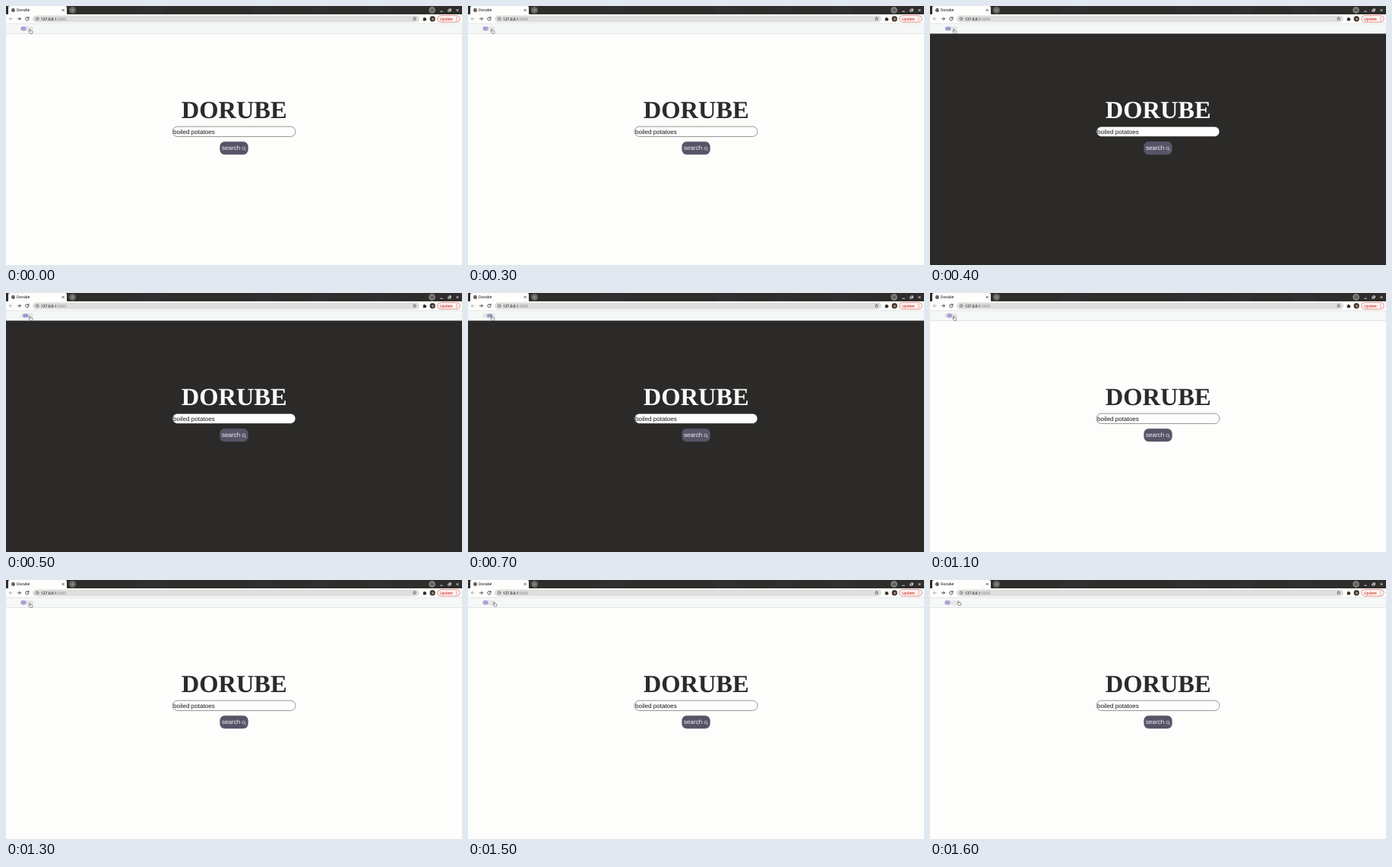
Animation of 600x342 px, one loop 1700 ms. Source, as an HTML page:

```html
<!DOCTYPE html>
<html lang="en">
<head>
<meta charset="utf-8">
<title>Dorube</title>
<style>
  html, body { margin: 0; width: 100%; height: 100%; overflow: hidden; }
  svg { display: block; width: 100%; height: 100%; }
  text { text-rendering: geometricPrecision; }
  .ui { font: 4.9px "Open Sans", "Noto Sans", sans-serif; stroke-width: .15; }
  .page { font: 8.1px "Liberation Sans", Arial, sans-serif; }
  .logo { font: bold 32.5px "Liberation Serif", "Times New Roman", serif; text-anchor: middle; }
  .line { fill: none; stroke-linecap: round; stroke-linejoin: round; }
</style>
</head>
<body>
<svg viewBox="0 0 600 342" xmlns="http://www.w3.org/2000/svg">
  <rect id="bg" width="600" height="342"/>

  <!-- tab strip -->
  <rect width="600" height="12" fill="#2e2d2c"/>
  <path d="M180 0h34l-12 11h-34zM318 0h30l14 11h-32zM410 0h22l-12 11h-26zM470 0h30l12 11h-30z" fill="#343332" opacity=".6"/>
  <path d="M1 12q2 0 2-2V2q0-2 2-2H78q2 0 2 2v8q0 2 2 2z" fill="#fdfdfc"/>
  <circle cx="9.500" cy="5.500" r="2.400" fill="#3c3b3a"/>
  <path class="line" d="M8 4.800l1.500.5-.4 1.400M10.200 3.800l.2 1 1 .5" stroke="#e4e4e2" stroke-width=".5"/>
  <text class="ui" x="14" y="7.200" fill="#302f2e" stroke="#302f2e">Dorube</text>
  <path class="line" d="M74 4.300l2.300 2.300m0-2.300l-2.300 2.300" stroke="#3a3938" stroke-width=".8"/>
  <circle cx="87.500" cy="5.500" r="4.500" fill="#696765"/>
  <path class="line" d="M85.800 5.500h3.400m-1.700-1.700v3.400" stroke="#a3a19e" stroke-width=".7"/>
  <circle cx="560.600" cy="5.500" r="4.400" fill="#82807d"/>
  <circle class="line" cx="560.600" cy="5.500" r="2" stroke="#4b4947" stroke-width=".7"/>
  <path d="M559.500 5.100h2.200l-1.100 1.300z" fill="#302e2c"/>
  <g class="line" stroke="#e6e4e1" stroke-width=".9">
    <path d="M571.700 7.200h2.600M582.200 5h2.200v2.200h-2.200zM583.300 3.900h2.200v2.200M592.900 4.400l2.300 2.300m0-2.300l-2.300 2.300"/>
  </g>

  <!-- toolbar -->
  <rect y="11" width="600" height="13" fill="#fdfdfc"/>
  <g class="line" stroke="#3d3c3b" stroke-width=".9">
    <path d="M8.200 16.900H4.400m1.700-1.800l-1.800 1.800 1.800 1.800" stroke="#a9a8a6"/>
    <path d="M15.500 16.900h3.800m-1.700-1.800l1.800 1.800-1.800 1.800"/>
    <path d="M29.600 15.500a2.200 2.200 0 1 0 .5 2M30 14.500v1.600h-1.600"/>
  </g>
  <rect x="35" y="12.600" width="509" height="8.800" rx="4.400" fill="#dededc"/>
  <circle class="line" cx="41" cy="16.900" r="2" stroke="#5b5a58" stroke-width=".6"/>
  <path class="line" d="M41 16.700v1.100M41 15.800v.1" stroke="#5b5a58" stroke-width=".6"/>
  <text class="ui" x="46" y="18.600" fill="#2e2d2c" stroke="#2e2d2c">127.0.0.1<tspan fill="#777674" stroke="none">:5000</tspan></text>
  <path class="line" id="star" stroke="#555452" stroke-width=".7"/>
  <path d="M548.700 15.700h1.200a.8.800 0 0 1 1.600 0h1.200v1.200a.8.800 0 0 1 0 1.600v1h-4v-1.200a.8.800 0 0 0 0-1.500z" fill="#2b2a29"/>
  <circle cx="561.200" cy="16.900" r="3.600" fill="#3f352e"/>
  <ellipse cx="561.500" cy="17.200" rx="1.500" ry="1.800" fill="#a58a76"/>
  <rect x="567.700" y="12.600" width="29.600" height="8.700" rx="4.350" fill="#fdf6f5" stroke="#dc7770" stroke-width=".8"/>
  <text class="ui" x="571" y="18.600" fill="#d33d34" stroke="#d33d34">Update</text>
  <path class="line" d="M593 14.900v.1m0 1.900v.1m0 1.900v.1" stroke="#d33d34" stroke-width="1"/>

  <!-- page header -->
  <rect id="nav" y="23" width="600" height="13.500"/>
  <path d="M0 23.400h600" stroke="#dfe1e0" stroke-width=".7"/>
  <path id="rule" d="M0 36.500h600" stroke="#dcdfdf" stroke-width=".8"/>
  <rect x="19" y="26.800" width="17" height="6.400" rx="3.200" fill="#e7e7e5"/>
  <rect id="knob" width="7.200"/>

  <!-- search form -->
  <text id="logo" class="logo" x="300.200" y="148.400">DORUBE</text>
  <rect id="field" x="219" y="159.200" width="162" height="13.300" rx="6.650" fill="#fefefd" stroke-width=".7"/>
  <text class="page" x="220" y="168.700" fill="#171716">boiled potatoes</text>
  <rect id="button" x="281.600" y="179.300" width="36.800" height="16.800" rx="6" fill="#575467" stroke-width=".4"/>
  <text class="page" x="284" y="190.300" fill="#f4f3f5">search</text>
  <path class="line" d="M310.900 188a1.900 1.900 0 1 0 3.800 0a1.900 1.900 0 1 0-3.800 0M314.200 189.400l1.500 1.600" stroke="#dddce2" stroke-width=".7"/>

  <path id="hand" d="M-1.400-2.900q.5-.5 1 .1l.3 1.900q2.100.1 2.700.7.500 1-.3 3H-.600q-1-1.300-1.800-2.400.1-.9 1.300-.1z"
    fill="#f8f8f7" stroke="#4a4948" stroke-width=".6" stroke-linejoin="round"/>
</svg>
<script>
  const LOOP = 1700, STEP = 100;
  const DARK_FROM = 400, DARK_TO = 1000;
  const LEFT = 23, RIGHT = 28.5;

  const el = id => document.getElementById(id);
  const set = (id, attrs) => {
    for (const name in attrs) el(id).setAttribute(name, attrs[name]);
  };
  const clamp = x => Math.min(1, Math.max(0, x));
  const smooth = x => x * x * (3 - 2 * x);
  const ramp = (t, start, span) => smooth(clamp((t - start) / span));

  const starPath = (cx, cy, r) => 'M' + Array.from({ length: 10 }, (_, i) => {
    const a = i * Math.PI / 5 - Math.PI / 2, d = i % 2 ? r * 0.48 : r;
    return (cx + d * Math.cos(a)).toFixed(2) + ' ' + (cy + d * Math.sin(a)).toFixed(2);
  }).join('L') + 'Z';
  set('star', { d: starPath(537.7, 17, 2.3) });

  function draw(time) {
    const t = Math.floor(time % LOOP / STEP) * STEP;
    const dark = t >= DARK_FROM && t < DARK_TO;
    const pick = (night, day) => dark ? night : day;

    set('bg', { fill: pick('#2b2a29', '#fdfdfb') });
    set('nav', { fill: pick('#f4f8f7', '#f6f8f7') });
    set('rule', { opacity: pick(0, 1) });
    set('logo', { fill: pick('#f9f9f8', '#2b2b2a') });
    set('field', { stroke: pick('#2b2a29', '#6d6c6b') });
    set('button', { stroke: pick('#67647a', '#575467') });

    // the switch glides over while the theme flips at once
    const slide = ramp(t, DARK_FROM - 100, 400) - ramp(t, DARK_TO - 100, 400);
    const h = pick(4.8, 5.6);
    set('knob', {
      x: LEFT - 3.6 + (RIGHT - LEFT) * slide,
      y: 29.8 - h / 2,
      height: h,
      rx: pick(2, 3.4),
      ry: pick(2, 2.8),
      fill: pick('#9799cc', '#a7a1d6')
    });

    const leave = clamp((t - 1400) / 200);
    set('hand', { transform: `translate(${32.2 + 6 * leave} ${33.5 - 2.8 * leave})` });
  }

  const start = performance.now();
  function tick() {
    draw(performance.now() - start);
    requestAnimationFrame(tick);
  }
  tick();
</script>
</body>
</html>
```
